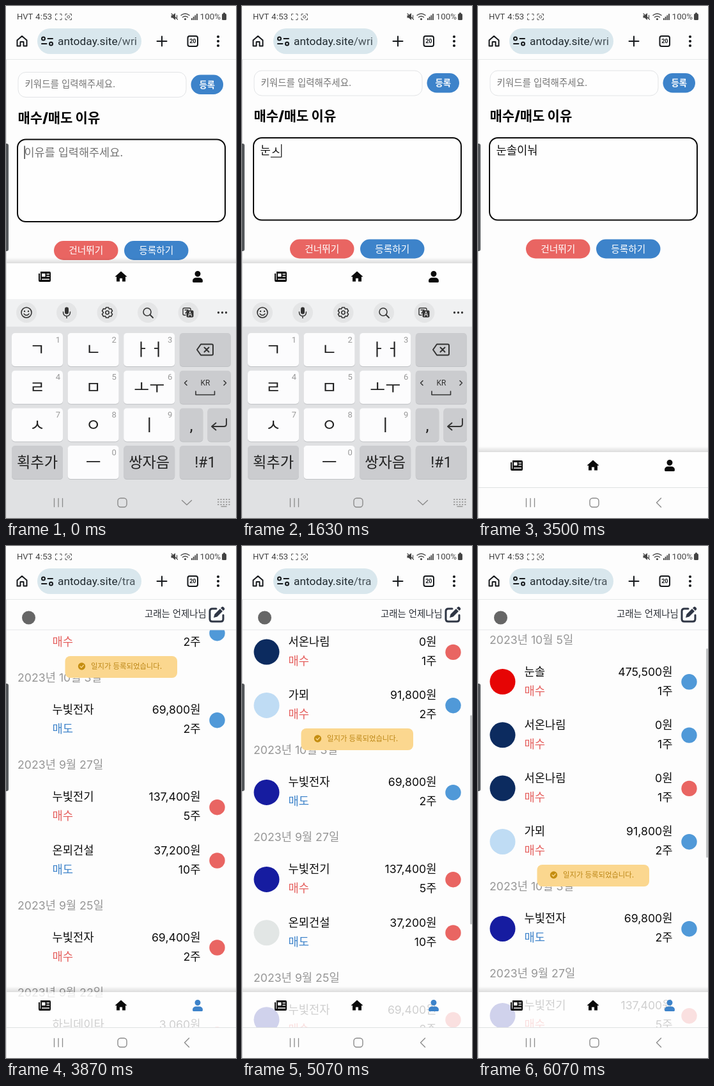
An HTML page for the animation above (6.11 s loop, 360 by 800 pixels).

```html
<!DOCTYPE html>
<html lang="ko">
<head>
<meta charset="utf-8">
<title>Trade journal</title>
<style>
html, body { margin: 0; width: 100%; height: 100%; overflow: hidden; background: #fdfdfd; }
svg { display: block; width: 360px; height: 800px; }
text { font-family: Inter, "Noto Sans CJK KR", "Noto Sans CJK", sans-serif; white-space: pre; }
.ui { font-family: Roboto, "Noto Sans CJK KR", sans-serif; }
.line { fill: none; stroke-linecap: round; stroke-linejoin: round; }
</style>
</head>
<body>
<svg id="stage" viewBox="0 0 360 800"></svg>
<script>
const LOOP = 6110, PAGE_SWITCH = 3520, LOGOS_IN = 4000;
const INK = '#16191c', RED = '#e96562', BLUE = '#3d83ca';

// --- markup helpers ---
const text = (x, y, s, size, fill = INK, extra = '') =>
  `<text x="${x}" y="${y}" font-size="${size}" fill="${fill}" ${extra}>${s}</text>`;
const ui = (x, y, s, size, fill = INK, extra = '') => text(x, y, s, size, fill, 'class="ui" ' + extra);
const rect = (x, y, w, h, r, fill, extra = '') =>
  `<rect x="${x}" y="${y}" width="${w}" height="${h}" rx="${r}" fill="${fill}" ${extra}/>`;
const disc = (x, y, r, fill, extra = '') => `<circle cx="${x}" cy="${y}" r="${r}" fill="${fill}" ${extra}/>`;
const ring = (x, y, r, width, color = INK, extra = '') =>
  disc(x, y, r, 'none', `stroke="${color}" stroke-width="${width}" ${extra}`);
const shape = (d, fill, extra = '') => `<path d="${d}" fill="${fill}" ${extra}/>`;
const line = (d, width = 2, color = INK, extra = '') =>
  `<path class="line" d="${d}" stroke="${color}" stroke-width="${width}" ${extra}/>`;
const group = (id, body, extra = '') => `<g id="${id}" ${extra}>${body}</g>`;
const MID = 'text-anchor="middle"', END = 'text-anchor="end"';

// --- top bars ---
const corners = x => line(`M${x} 15v-2.500h2.500m4.500 0h2.500v2.500m0 4v2.500h-2.500m-4.500 0h-2.500v-2.500`, 1, '#555');
const statusBar = () =>
  ui(17, 21, 'HVT', 13, '#444') + ui(46, 21, '4:53', 13.6, '#444') +
  corners(77.5) + corners(93) +
  ring(82.3, 17, 2, 1, '#555', 'id="scan"') + ring(97.8, 17, 2, 1, '#555') +
  shape('M258.500 14.500h2.500l4-3.500v11l-4-3.500h-2.500z', '#444') + line('M259 12l9.500 9M267.500 14.500v4', 1.2, '#444') +
  line('M274 14.500q6.500-5 13 0M276.500 17.500q4-3 8 0', 1.4, '#444') + disc(280.5, 20.5, 1.6, '#444') +
  [0, 1, 2, 3].map(i => rect(290 + i * 2.7, 19 - i * 2.3, 1.8, 3 + i * 2.3, 0, '#444')).join('') +
  ui(336, 21, '100%', 13.4, '#444', END) +
  rect(338, 12, 7, 10, 1.5, '#444') + rect(340, 10.5, 3, 2, 0, '#444');

const browserBar = () =>
  line('M17.500 53.500 25 47l7.500 6.500v9h-5v-6.500h-5v6.500h-5z', 2) +
  rect(49, 35, 163, 40, 20, '#d9e7ed') +
  line('M65.500 51h7.500M56 59h7.500', 2) + ring(58.5, 51, 2.5, 2) + ring(70.5, 59, 2.5, 2) +
  ui(81, 61, 'antoday.site<tspan id="path" fill="#4b565c"></tspan>', 17.4, '#202a2f') +
  line('M236.500 55h15M244 47.500v15', 2) +
  rect(284.5, 47, 15.5, 16, 3, 'none', 'stroke="#16191c" stroke-width="2"') +
  ui(292.3, 58.3, '20', 9, INK, MID + ' font-weight="700"') +
  [48, 55, 62].map(y => disc(332, y, 2.1, INK)).join('');

// --- entry form ---
const CHAR = 16.3;
const pill = (x, y, w, h, fill, label, size, weight) =>
  rect(x, y, w, h, h / 2, fill) +
  text(x + w / 2, y + h / 2 + size * .36, label, size, '#fff', `${MID} font-weight="${weight}"`);
const form = () =>
  rect(19, 101, 263, 39, 12, '#fefefe', 'stroke="#e2e4e6"') +
  text(29.5, 124.5, '키워드를 입력해주세요.', 14.5, '#757575') +
  pill(289.5, 105, 50.5, 30.5, BLUE, '등록', 13.3, 700) +
  text(18.5, 179, '매수/매도 이유', 21, '#000', 'font-weight="900"') +
  rect(18, 206, 325, 128.5, 13, '#fefefe', 'stroke="#0b0b0b" stroke-width="2"') +
  group('hint', text(28.5, 232, '이유를 입력해주세요.', 17.5, '#757575')) +
  text(28.5, 232, '', 17.7, '#111', 'id="typed"') +
  rect(0, 235.5, CHAR, 1.2, 0, '#222', 'id="under"') +
  rect(0, 216, 1.2, 20.5, 0, '#111', 'id="caret"') +
  pill(75, 364.5, 100.5, 30, RED, '건너뛰기', 14.7, 400) +
  pill(185, 364.5, 100.5, 30, BLUE, '등록하기', 14.7, 400);

// --- trade list: dates are strings, trades are arrays ---
const NAVY = '#0c2b5f', ROYAL = '#161ca0', DOT_BLUE = '#5099d8';
const entries = [
  '2023년 10월 5일',
  ['눈솔', '475,500', '매수', 1, DOT_BLUE, '#e60505'],
  ['서온나림', '0', '매수', 1, DOT_BLUE, NAVY],
  ['서온나림', '0', '매수', 1, RED, NAVY],
  ['가뫼', '91,800', '매수', 2, DOT_BLUE, '#bfdcf4'],
  '2023년 10월 3일',
  ['누빛전자', '69,800', '매도', 2, DOT_BLUE, ROYAL],
  '2023년 9월 27일',
  ['누빛전기', '137,400', '매수', 5, RED, ROYAL],
  ['온뫼건설', '37,200', '매도', 10, RED, '#e2e6e5'],
  '2023년 9월 25일',
  ['누빛전자', '69,400', '매수', 2, RED, ROYAL],
  '2023년 9월 22일',
  ['하늬데이타', '3,060', '매수', 1, RED, ROYAL],
];
const trade = (y, [name, price, side, count, dot, logo]) =>
  disc(38.5, y + 16, 20, logo, 'class="logo"') +
  text(72.5, y + 6.5, name, 17.7, '#0d0d0d') +
  text(72.5, y + 36.5, side, 17.7, side === '매수' ? '#e55f5d' : BLUE) +
  text(304.5, y + 6.5, price + '원', 17.7, '#0d0d0d', END) +
  text(304.5, y + 36.5, count + '주', 17.7, '#0d0d0d', END) +
  disc(330.5, y + 16.3, 12.2, dot);
const tradeList = () => {
  let y = 146, out = '';
  entries.forEach((e, i) => {
    const isDate = typeof e === 'string', next = entries[i + 1];
    out += isDate ? text(18, y + 6.5, e, 17.7, '#969696') : trade(y, e);
    y += isDate ? 50 : typeof next === 'string' ? 86 : 83.3;
  });
  return out;
};
const toast = () =>
  rect(92.5, 498, 175.5, 34, 8, '#fbd78f') + disc(118.5, 514, 5.7, '#c48d10') +
  line('M116 514l2 2 3.300-3.700', 1.3, '#fbd78f') +
  text(133, 518.3, '일지가 등록되었습니다.', 11.4, '#bd8716', 'font-weight="500"');
const pageHeader = () =>
  rect(0, 84, 360, 47, 0, '#fdfdfd') + rect(0, 130.5, 360, 1, 0, '#e6e8e9') +
  disc(35.5, 112, 10.5, '#666') +
  text(217, 111.3, '고래는 언제나님', 14.4, '#2b2f36') +
  line('M329 98h-6q-4 0-4 4v12q0 4 4 4h13q4 0 4-4v-6', 3, '#2f3645') +
  shape('M325 112l1.500-5.500 8.500-8.500 4 4-8.500 8.500zM336 97l1.500-1.500q1.500-1.300 3 0l1.200 1.200q1.300 1.500 0 3l-1.700 1.300z', '#2f3645');

// --- tab bar, drawn for a top edge at y = 0 ---
const tabs = () =>
  rect(0, -9, 360, 9, 0, 'url(#shade)') + rect(0, 0, 360, 56, 0, '#fff', 'fill-opacity=".8"') +
  shape('M54 13h14q2 0 2 2v12q0 2-2 2H53q-2 0-2-2V16h2v10h1z', '#0b0b0b') +
  rect(56, 16, 5.5, 5, 0, '#fff') + line('M64 17h3.500M64 20.500h3.500M56.500 25h11', 1.5, '#fff') +
  shape('M180 12.500l9.500 8.500h-2.500v7.500h-5v-5h-4v5h-5v-7.500h-2.500z', '#0b0b0b') +
  shape('M300 12a4.500 4.500 0 1 1 0 9a4.500 4.500 0 1 1 0-9zM298 22.500h4q6 0 6 5.500q0 2-1.500 2h-13q-1.500 0-1.500-2q0-5.500 6-5.500z', '#0b0b0b', 'id="user"');

// --- keyboard ---
const keyLabels = ['ㄱ', 'ㄴ', 'ㅏㅓ', '', 'ㄹ', 'ㅁ', 'ㅗㅜ', '', 'ㅅ', 'ㅇ', 'ㅣ', ',', '획추가', 'ㅡ', '쌍자음', '!#1'];
const keyDigits = { 0: 1, 1: 2, 2: 3, 4: 4, 5: 5, 6: 6, 8: 7, 9: 8, 10: 9, 13: 0 };
const KEY = '#fcfcfd', FN_KEY = '#cbcccf';
const key = (label, i) => {
  const x = 9 + i % 4 * 87.6, y = 511 + (i >> 2) * 58.7;
  const isFn = i % 4 === 3 || i === 12 || i === 14, w = i === 11 ? 36.5 : 80;
  const size = i >= 12 && i !== 13 ? 23.2 : 26;
  return rect(x, y + 1, w, 52, 5, '#bfc1c4') +
    rect(x, y, w, 52, 5, isFn ? FN_KEY : KEY, `id="key${i}"`) +
    ui(x + w / 2, y + 26 + size * .36, label, size, '#222', `${MID} font-weight="${isFn ? 400 : 500}"`) +
    (i in keyDigits ? ui(x + 72.5, y + 14.5, keyDigits[i], 13, '#999', MID) : '');
};
const toolbar = () =>
  rect(0, 458, 360, 44, 0, '#f0f1f2') +
  [32, 95, 158.5, 222, 285.5].map(x => disc(x, 479, 16, '#e4e5e6')).join('') +
  ring(32, 479, 8, 1.6, '#333') + ring(158.5, 479, 2.7, 1.6, '#333') + ring(221, 478, 6, 1.6, '#333') +
  disc(29, 477, 1.2, '#333') + disc(35, 477, 1.2, '#333') + line('M28 481q4 4.500 8 0', 1.5, '#333') +
  rect(92, 470.5, 6, 11, 3, '#333') + line('M89.500 478q0 6.500 5.500 6.500t5.500-6.500M95 484.500v3', 1.5, '#333') +
  line('M156.500 471h4l1 2.500 3-.5 2 3.500-2 2.500 2 2.500-2 3.500-3-.5-1 2.500h-4l-1-2.500-3 .5-2-3.500 2-2.500-2-2.500 2-3.500 3 .5z', 1.6, '#333') +
  line('M225.500 482.500l4.500 4.500', 1.8, '#333') +
  line('M281 483h-2q-2 0-2-2v-7q0-2 2-2h8q2 0 2 2v1M280 475h5l-4 5', 1.4, '#333') +
  rect(282.5, 475.5, 11, 11, 2, '#333') + ui(288, 485, 'A', 10, '#fff', MID) +
  [332.5, 338.5, 344.5].map(x => disc(x, 479, 1.7, '#333')).join('');
const keyboard = () =>
  toolbar() + rect(0, 501, 360, 300, 0, '#e0e1e3') + keyLabels.map(key).join('') +
  line('M299 537l6-8.500h17q2 0 2 2v13q0 2-2 2h-17zM310.500 533.500l7 7m0-7l-7 7', 2, '#333') +
  ui(312, 593.3, 'KR', 12, '#333', MID) + line('M297 602v5.500h29.500V602', 1.6, '#333') +
  line('M283 585.500l-3.500 3.500 3.500 3.500M341 585.500l3.500 3.500-3.500 3.500', 1.5, '#333') +
  rect(315.5, 629.4, 36.5, 52, 5, '#bfc1c4') + rect(315.5, 628.4, 36.5, 52, 5, FN_KEY) +
  line('M345 645v8q0 4-4 4h-18m5.500-5.500L322 657l6.500 5.500', 1.9, '#333');

const systemBar = () =>
  rect(0, 752, 360, 48, 0, '#fdfdfd', 'id="sysBg"') + rect(0, 752, 360, 1, 0, '#dfe1e2', 'id="sysLine"') +
  line('M75.500 769.500v13M82 769.500v13M88.500 769.500v13', 1.3, '#8b8b8b') +
  rect(175, 769, 14, 14, 4.5, 'none', 'stroke="#8b8b8b" stroke-width="1.400"') +
  group('hideKeys', line('M275.500 772.500l7.500 7 7.500-7', 1.4, '#8b8b8b') +
    line('M332 771h18M332 775h18M332 779h18', 2, '#999', 'stroke-dasharray="0.500 3.800"') + line('M337 782h8', 1.5, '#999')) +
  group('back', line('M286.500 769l-7 7 7 7', 1.4, '#8b8b8b'));

document.getElementById('stage').innerHTML =
  '<defs><linearGradient id="shade" x2="0" y2="1"><stop stop-opacity="0"/><stop offset="1" stop-opacity=".13"/></linearGradient></defs>' +
  rect(0, 0, 360, 800, 0, '#fdfdfd') +
  group('form', form()) +
  group('trades', group('scroller', tradeList() + group('toast', toast())) + pageHeader()) +
  group('tabs', tabs()) + group('keyboard', keyboard()) + systemBar() +
  rect(357, 0, 3, 327, 1.5, '#c2c4c5', 'id="bar"') +
  rect(0, 0, 360, 84, 0, '#fdfdfd') + rect(0, 83, 360, 1, 0, '#e6e8e9') + statusBar() + browserBar() +
  rect(0, 84, 1, 716, 0, '#d8d9da') + rect(-4, 215, 8, 168, 3, '#55585b');

// --- motion ---
const $ = id => document.getElementById(id);
const set = (id, name, value) => $(id).setAttribute(name, value);
const show = (id, on) => set(id, 'visibility', on ? 'visible' : 'hidden');
const moveY = (id, y) => set(id, 'transform', `translate(0 ${y})`);
const ease = (t, a, b) => { const u = Math.min(1, Math.max(0, (t - a) / (b - a))); return u * u * (3 - 2 * u); };

// time, text after the press, key index
const presses = [
  [400, 'ㄴ', 1], [720, '노', 6], [900, '누', 6], [1150, '눈', 1], [1480, '눈ㅅ', 8], [1780, '눈소', 6],
  [1950, '눈솔', 4], [2040, '눈솔ㅇ', 9], [2130, '눈솔이', 10], [2210, '눈솔이ㄴ', 1],
  [2290, '눈솔이노', 6], [2370, '눈솔이누', 6], [2450, '눈솔이눠', 2], [2640, '눈솔이눠', 2],
];
const drag = [[4330, 326], [4600, 312], [4850, 282], [5070, 213.5], [5200, 110], [5330, 38], [5560, 10], [6070, 0]];

// Cubic Hermite through the drag points, at rest on both ends
function scrollAt(t) {
  const last = drag.length - 1;
  if (t <= drag[0][0]) return drag[0][1];
  if (t >= drag[last][0]) return drag[last][1];
  const slope = i => i === 0 || i === last ? 0 :
    (drag[i + 1][1] - drag[i - 1][1]) / (drag[i + 1][0] - drag[i - 1][0]);
  const i = drag.findIndex(p => p[0] > t) - 1;
  const [t0, y0] = drag[i], [t1, y1] = drag[i + 1], d = t1 - t0, u = (t - t0) / d, v = 1 - u;
  return y0 * v * v * (1 + 2 * u) + y1 * u * u * (3 - 2 * u) + d * u * v * (slope(i) * v - slope(i + 1) * u);
}

function drawForm(t) {
  const press = presses.filter(p => p[0] <= t).pop();
  const typed = press ? press[1] : '', end = 28.5 + typed.length * CHAR;
  moveY('form', 2.5 * (1 - ease(t, 30, 130)));
  $('typed').textContent = typed;
  set('hint', 'opacity', typed ? 0 : 1);
  set('under', 'opacity', typed && t < 3230 ? 1 : 0);
  set('caret', 'opacity', t < 3230 ? 1 : 0);
  set('under', 'x', end - CHAR);
  set('caret', 'x', end);
  for (const [, , k] of presses) set('key' + k, 'fill', press && k === press[2] && t < press[0] + 70 ? '#dcdde0' : KEY);
}

function drawTrades(t) {
  const scroll = scrollAt(t);
  moveY('scroller', -scroll);
  set('toast', 'opacity', ease(t, 3620, 3780));
  for (const logo of document.querySelectorAll('.logo')) logo.setAttribute('opacity', t < LOGOS_IN ? 0 : 1);
  set('bar', 'y', 160 + scroll * .49);
  set('bar', 'opacity', ease(t, 4330, 4400));
}

function draw(t) {
  const onTrades = t >= PAGE_SWITCH, slide = 295 * ease(t, 3230, 3460), keysUp = slide < 295;
  drawForm(t);
  drawTrades(t);
  set('form', 'display', onTrades ? 'none' : 'inline');
  set('trades', 'display', onTrades ? 'inline' : 'none');
  $('path').textContent = onTrades ? '/tra' : '/wri';
  moveY('tabs', 402 + slide);
  moveY('keyboard', slide);
  show('keyboard', keysUp);
  set('user', 'fill', onTrades ? BLUE : '#0b0b0b');
  set('sysBg', 'fill', keysUp ? '#e0e1e3' : '#fdfdfd');
  show('sysLine', !keysUp);
  show('hideKeys', keysUp);
  show('back', !keysUp);
  show('scan', t >= 5200 && t < 5600);
}

const start = performance.now();
function tick() {
  draw((performance.now() - start) % LOOP);
  requestAnimationFrame(tick);
}
tick();
</script>
</body>
</html>
```
